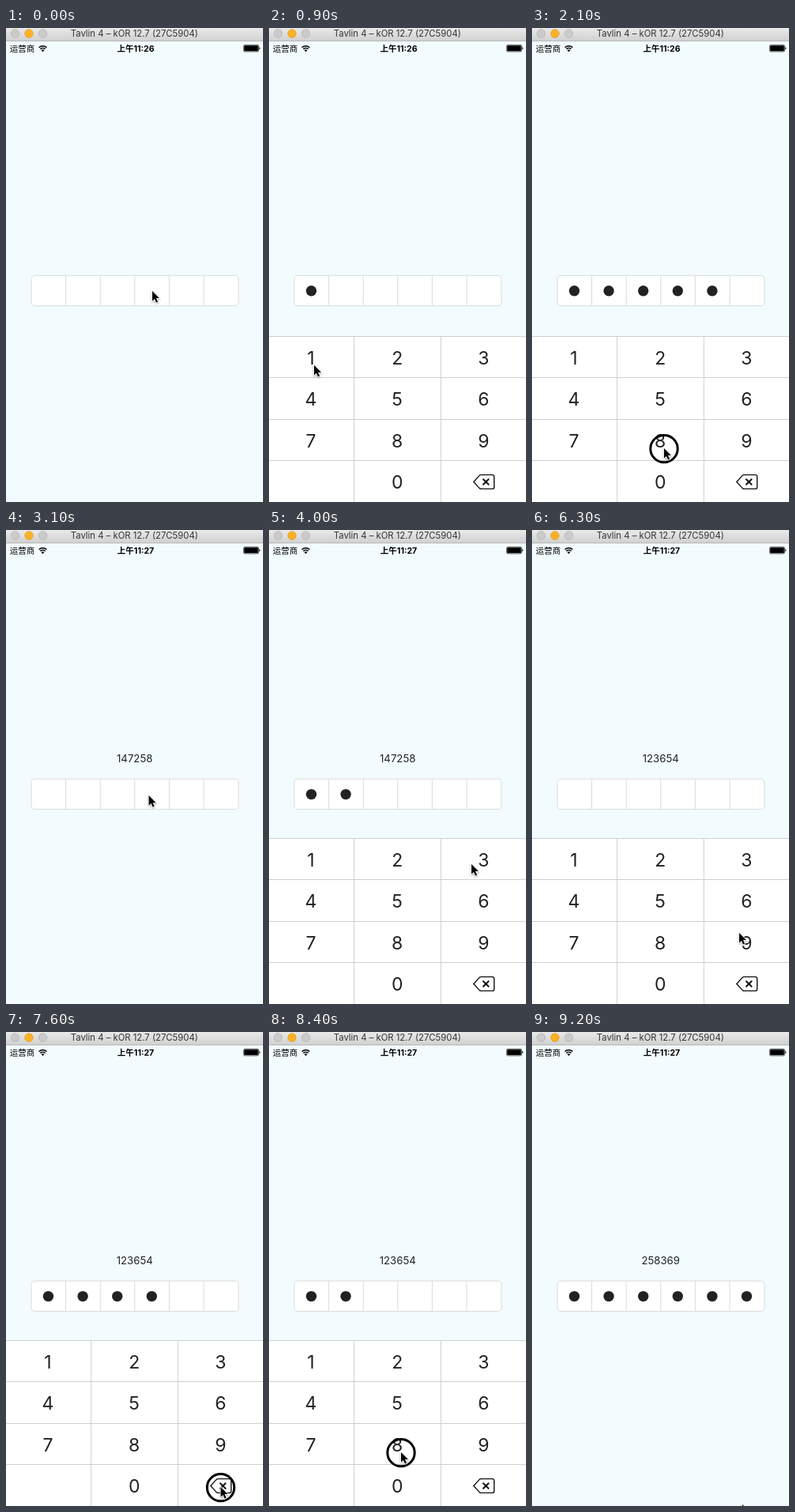
Animation of 325 by 600 pixels, one loop 9.3 s. Source, as an HTML page:

```html
<!DOCTYPE html>
<html lang="zh">
<head>
<meta charset="utf-8">
<title>Passcode field</title>
<style>
  html, body { margin: 0; width: 100%; height: 100%; overflow: hidden; background: #f2fcff; }
  svg { display: block; width: 325px; height: 600px; }
  text { font-family: Inter, "Noto Sans CJK SC", "Noto Sans CJK", sans-serif; fill: #222; text-anchor: middle; }
  #arrow { filter: drop-shadow(0 1px 1px rgba(0, 0, 0, .35)); }
</style>
</head>
<body>
<svg viewBox="0 0 325 600">
  <defs>
    <linearGradient id="bar" x2="0" y2="1">
      <stop stop-color="#e9e9e9"/><stop offset="1" stop-color="#d0d0d0"/>
    </linearGradient>
  </defs>
  <rect width="325" height="600" fill="#f2fcff"/>

  <rect width="325" height="16.5" fill="url(#bar)"/>
  <path d="M0 16.5H325" stroke="#b9b9b9"/>
  <g fill="#cbcbcb" stroke="#b3b3b3" stroke-width=".8">
    <circle cx="11.5" cy="7" r="5.2"/>
    <circle cx="29" cy="7" r="5.2" fill="#fdb125" stroke="#e09c22"/>
    <circle cx="46.5" cy="7" r="5.2"/>
  </g>
  <text x="162.3" y="11.2" font-size="11.3" style="fill:#333">Tavlin 4 – kOR 12.7 (27C5904)</text>

  <text x="20.5" y="29.6" font-size="10.5" style="fill:#000">运营商</text>
  <g fill="none" stroke="#000" stroke-width="1.5">
    <path d="M41.6 24.7a7 7 0 0 1 9.8 0M43.4 26.8a4.4 4.4 0 0 1 6.2 0"/>
    <path d="M46.5 30.2l-1.9-2a2.7 2.7 0 0 1 3.8 0z" fill="#000" stroke="none"/>
  </g>
  <text id="clock" x="164" y="29.6" font-size="10.5" font-weight="700" style="fill:#000"></text>
  <rect x="300.5" y="21.5" width="19" height="8.5" rx="1.5" fill="none" stroke="#000" stroke-width=".6"/>
  <rect x="301.2" y="22.2" width="17.6" height="7.1" rx=".8"/>
  <path d="M320.3 24a2 2 0 0 1 0 3.6z"/>

  <text id="label" x="162.7" y="294" font-size="13.2"></text>
  <g id="field">
    <rect x="32" y="313.3" width="262" height="38.4" rx="4.5" fill="#fff" stroke="#d8dbdc"/>
  </g>

  <g id="pad">
    <rect y="390" width="325" height="210" fill="#fff"/>
    <path d="M0 390.5H325M0 442.5H325M0 495.5H325M0 547.5H325M107.7 390V600M217.3 390V600" stroke="#cdcfd0" fill="none"/>
    <g fill="none" stroke="#111" stroke-linejoin="round" stroke-linecap="round">
      <path d="M258.8 574.5L266 566.6Q267 565.6 268.4 565.6H282.5Q284.7 565.6 284.7 567.8V581.2Q284.7 583.4 282.5 583.4H268.4Q267 583.4 266 582.4Z" stroke-width="1.4"/>
      <path d="M271 571.2l6.6 6.6m0-6.6l-6.6 6.6" stroke-width="2"/>
    </g>
  </g>

  <g id="cursor">
    <circle id="ring" cy=".6" r="17.2" fill="none" stroke="#000" stroke-width="3"/>
    <path id="arrow" d="M0 0V12.6L2.9 9.9L5 14.6L7.1 13.7L5 9.1H9Z" stroke="#fff" stroke-width="1.6" paint-order="stroke"/>
  </g>
</svg>
<script>
const $ = id => document.getElementById(id);
const add = (parent, tag, attrs, text = '') => {
  const el = document.createElementNS('http://www.w3.org/2000/svg', tag);
  for (const k in attrs) el.setAttribute(k, attrs[k]);
  el.textContent = text;
  return parent.appendChild(el);
};

const LOOP = 9300, STEP = 100, SLIDE = 300, CELL = 43.6;

// Stops of the pointer: [time, key] is a click, [time, x, y] a plain move.
const FIELD = 'F', DEL = '<';
const COLUMNS = [57, 167, 271.5], ROWS = [422, 468.5, 532, 576];
const stops = [
  [0, 185, 333], [100, FIELD],
  [800, '1'], [1100, '4'], [1400, '7'], [1700, '2'], [1900, '5'], [2100, '8'],
  [2700, 185, 333], [3000, FIELD],
  [3500, '1'], [3800, '2'], [4000, 256, 423], [4100, '3'], [4400, '6'], [4800, '5'],
  [5200, 57, 468.5], [5500, '4'],
  [5900, FIELD], [6300, 262, 510],
  [6400, '9'], [6600, '6'], [6800, '3'], [7000, '2'], [7200, '5'],
  [7400, DEL], [7600, DEL], [7700, DEL], [7800, DEL], [7900, DEL],
  [8100, '2'], [8200, '5'], [8400, '8'], [8600, '3'], [8700, '6'], [8800, '9'],
  [9200, 266, 598]
].map(([time, a, b]) => {
  if (typeof a === 'number') return { time, x: a, y: b };
  if (a === FIELD) return { time, key: a, x: 185, y: 333 };
  const i = a === DEL ? 11 : a - 1;
  return { time, key: a, x: COLUMNS[i % 3], y: ROWS[Math.floor(i / 3)] };
});

for (let i = 1; i < 6; i++) {
  const x = 32 + i * CELL;
  add($('field'), 'path', { d: `M${x} 313.5V351.5`, stroke: '#d8dbdc' });
}
const dots = [...Array(6).keys()].map(i =>
  add($('field'), 'circle', { cx: 53.5 + i * CELL, cy: 332.8, r: 6.7, fill: '#222' }));
[...'123456789', '', '0'].forEach((key, i) =>
  add($('pad'), 'text', { x: 53 + 109.2 * (i % 3), y: 425.7 + 52.4 * Math.floor(i / 3), 'font-size': 23 }, key));

// Replays all clicks up to the given time; a click acts on release.
function stateAt(t) {
  const s = { code: '', label: '', open: false, since: -SLIDE };
  for (const { time, key } of stops) {
    const release = time + STEP;
    if (!key || release > t) continue;
    if (key === FIELD) Object.assign(s, { code: '', open: true, since: release });
    else if (key === DEL) s.code = s.code.slice(0, -1);
    else s.code += key;
    if (s.code.length === 6) Object.assign(s, { label: s.code, open: false, since: release });
  }
  return s;
}

function pointerAt(t) {
  const i = stops.findLastIndex(s => s.time <= t);
  const from = stops[i], to = stops[i + 1] || from;
  const clicked = !!from.key && t < from.time + STEP;
  const start = from.time + (from.key ? STEP / 2 : 0);
  const p = Math.min(1, Math.max(0, (t - start) / (to.time - start || 1)));
  const e = clicked ? 0 : p * p * (3 - 2 * p);
  return { x: from.x + (to.x - from.x) * e, y: from.y + (to.y - from.y) * e, clicked };
}

function draw(now) {
  const t = Math.floor(now % LOOP / STEP) * STEP;
  const { code, label, open, since } = stateAt(t);
  const p = Math.min(1, (t - since) / SLIDE);
  const eased = 1 - (1 - p) ** 2;
  const shown = open ? eased : 1 - eased;
  const pointer = pointerAt(t);

  $('clock').textContent = t < 2800 ? '上午11:26' : '上午11:27';
  $('label').textContent = label;
  $('field').setAttribute('transform', `translate(0 ${label ? 1.8 : 0})`);
  dots.forEach((dot, i) => dot.setAttribute('visibility', i < code.length ? 'visible' : 'hidden'));
  $('pad').setAttribute('transform', `translate(0 ${212 * (1 - shown)})`);
  $('cursor').setAttribute('transform', `translate(${pointer.x} ${pointer.y})`);
  $('ring').setAttribute('visibility', pointer.clicked ? 'visible' : 'hidden');
}

const begin = performance.now();
function tick() {
  draw(performance.now() - begin);
  requestAnimationFrame(tick);
}
tick();
</script>
</body>
</html>
```
